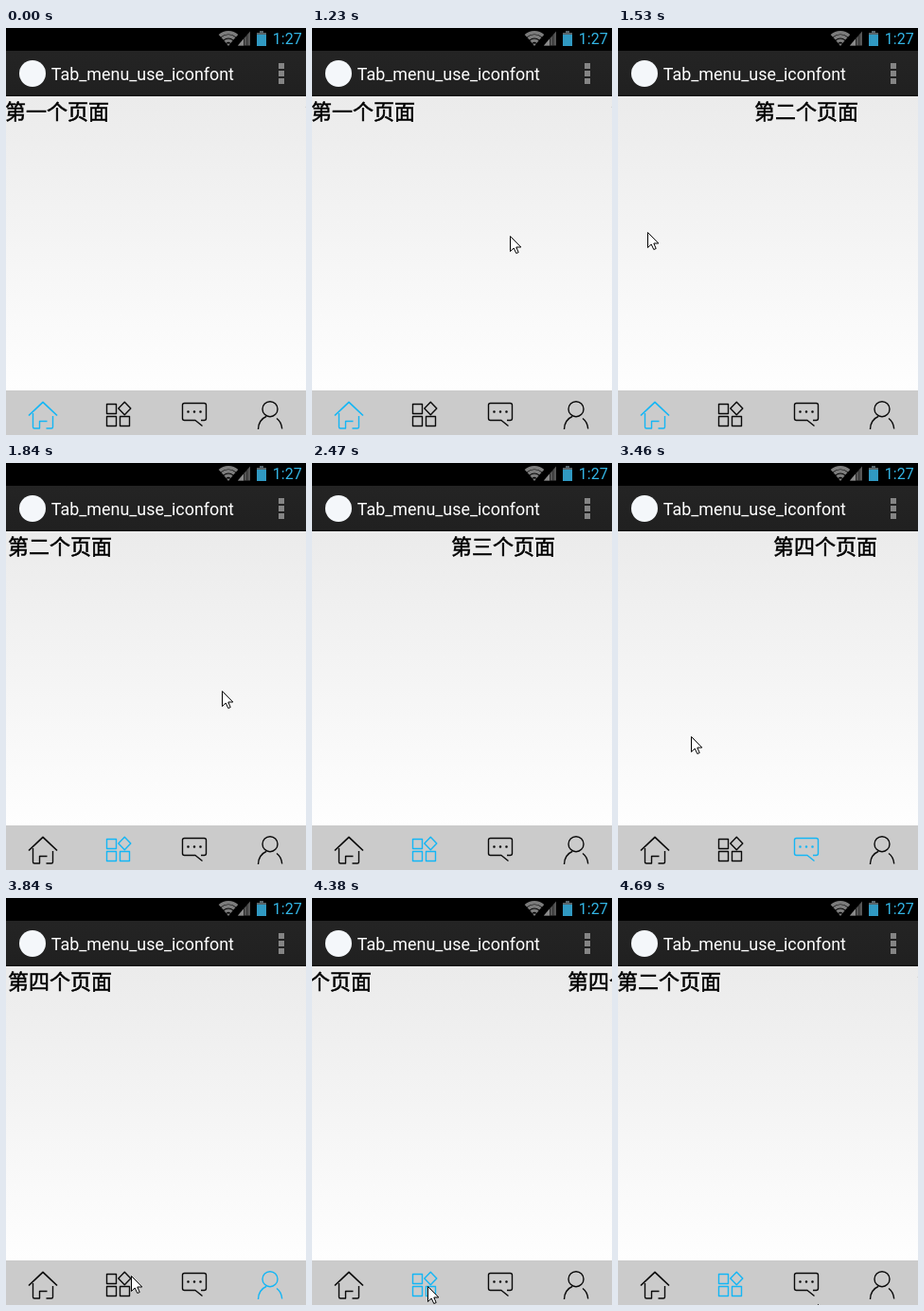
Recreate the animation shown at these times as an HTML page. Size 317x429 px, loop 5310 ms.

```html
<!DOCTYPE html>
<html lang="zh">
<head>
<meta charset="utf-8">
<title>Tab menu</title>
<style>
  html, body { margin: 0; width: 100%; height: 100%; overflow: hidden; background: #000; }
  svg { display: block; width: 100%; height: 100%; }
  .ui { font-family: Roboto, sans-serif; }
  .page { font: 500 22px "Noto Sans CJK SC", "Noto Sans CJK", sans-serif; stroke: #000; stroke-width: .5; }
  .tab { fill: none; stroke: #0a0a0a; stroke-width: 1.4; stroke-linejoin: round; }
  .tab.on { stroke: #14b6f5; }
  .dots { stroke-width: 2.6; stroke-linecap: round; }
</style>
</head>
<body>
<svg viewBox="0 0 317 429">
  <defs>
    <linearGradient id="paper" x2="0" y2="1">
      <stop stop-color="#ebebeb"/><stop offset="1" stop-color="#fefefe"/>
    </linearGradient>
    <linearGradient id="bar" x2="0" y2="1">
      <stop stop-color="#242424"/><stop offset="1" stop-color="#202020"/>
    </linearGradient>
  </defs>

  <rect y="72" width="317" height="310" fill="url(#paper)"/>
  <g id="pages" class="page"></g>

  <rect width="317" height="24" fill="#000"/>
  <g fill="none" stroke="#7c7c7c" stroke-width="3.5">
    <path d="M225.8 8.2A14 14 0 0 1 244.2 8.2M228.6 11.3A9.6 9.6 0 0 1 241.4 11.3M231.5 14.6A5.2 5.2 0 0 1 238.5 14.6"/>
    <path d="M233 16.6H237L235 19Z" fill="#7c7c7c" stroke="none"/>
  </g>
  <path d="M245 18.5L258 3.5V18.5Z" fill="#555"/>
  <path d="M245 18.5L251 11.6V18.5Z" fill="#8a8a8a"/>
  <path d="M251.5 10V19M254.8 7V19" stroke="#222" stroke-width=".8"/>
  <path d="M265 5H268V3H272V5H275V19H265Z" fill="#57646a"/>
  <path d="M265 7H275V19H265Z" fill="#3099c2"/>
  <text class="ui" x="281.8" y="17" font-size="16" fill="#33b5e5">1:27</text>

  <rect y="24" width="317" height="48" fill="url(#bar)"/>
  <rect y="70.5" width="317" height="1.5" fill="#121212"/>
  <circle cx="28" cy="48" r="14" fill="#f4f7fa"/>
  <text class="ui" x="47.8" y="55" font-size="17.9" fill="#fff">Tab_menu_use_iconfont</text>
  <path d="M288 37h6v6h-6zM288 45h6v6h-6zM288 53h6v6h-6z" fill="#858585"/>

  <rect y="382" width="317" height="47" fill="#cbcbcb"/>
  <g class="tab">
    <path d="M24 408.5L39 394.3L54 408.5" stroke-width="1.7"/>
    <path d="M28.5 406V420.5Q28.5 422 30 422H35.5V414.5H43.5M49.5 409V420.5Q49.5 422 48 422H42.5"/>
  </g>
  <g class="tab">
    <path d="M106.5 396.5h10v10h-10zM106.5 409.5h10v10h-10zM120.5 409.5h10v10h-10z"/>
    <path d="M125.3 394.3l6.5 6.7l-6.5 6.7l-6.5 -6.7z"/>
  </g>
  <g class="tab">
    <path d="M206 413.5H209.5Q211.5 413.5 211.5 411.5V397.5Q211.5 395.5 209.5 395.5H188.5Q186.5 395.5 186.5 397.5V411.5Q186.5 413.5 188.5 413.5H200L207.5 419.5"/>
    <path class="dots" d="M192.5 404.5h.01M199 404.5h.01M205.5 404.5h.01"/>
  </g>
  <g class="tab">
    <circle cx="279" cy="401.7" r="8"/>
    <path d="M266.5 423Q266.8 413 275 409.5M286 411.5Q291 415 291.7 422.5"/>
  </g>

  <path id="cursor" d="M.5 .5V16.5L4.2 13L6.8 18.5L9.2 17.5L6.8 12H11.8Z" fill="#fff" stroke="#000"/>
</svg>

<script>
const LOOP = 5310, WIDTH = 317;
const FIRST_STEP = 300, FPS = 13;      // the screen refreshes in steps
const DRAG = 370, SETTLE = 450, REACH = .56;
const SWIPES = [1223, 2165, 3223];     // start of each swipe to the next page
const TAP = 4340, TAP_DELAY = 30, JUMP = 350;

// Pointer legs: leave, arrive, x, y
const HOME = [38, 410];
const LEGS = [
  [300, 770, 225, 219],
  [1208, 1580, 28, 215], [1580, 2000, 263, 244],
  [2140, 2530, -40, 255], [2640, 3150, 305, 270],
  [3190, 3570, 54, 290], [3570, 3835, 132, 398],
  [3840, 4150, 118, 408],
  [4370, 4690, 211, 428]
];

const pages = document.getElementById("pages");
const cursor = document.getElementById("cursor");
const tabs = [...document.querySelectorAll(".tab")];

[..."一二三四"].forEach((n, i) => {
  const text = document.createElementNS(pages.namespaceURI, "text");
  text.setAttribute("x", i * WIDTH - 1);
  text.setAttribute("y", 95.6);
  text.textContent = `第${n}个页面`;
  pages.append(text);
});

const progress = (t, from, length) => Math.min(1, Math.max(0, (t - from) / length));
const easeOut = (u, power) => 1 - (1 - u) ** power;

// The finger drags a page partway, then the rest settles.
const swipe = (t, start) =>
  REACH * easeOut(progress(t, start, DRAG), 2) +
  (1 - REACH) * easeOut(progress(t, start + DRAG, SETTLE), 5);

function scrollAt(t) {
  const swiped = SWIPES.reduce((sum, start) => sum + swipe(t, start), 0);
  return swiped - 2 * easeOut(progress(t, TAP, JUMP), 5);
}

const tabAt = t =>
  t >= TAP + TAP_DELAY ? 1 : SWIPES.filter(start => t >= start + DRAG).length;

function pointerAt(t) {
  if (t < FIRST_STEP) return [-40, 0];
  let [x, y] = HOME;
  for (const [leave, arrive, toX, toY] of LEGS) {
    const u = easeOut(progress(t, leave, arrive - leave), 2);
    x += (toX - x) * u;
    y += (toY - y) * u;
  }
  return [Math.round(x), Math.round(y)];
}

function draw(time) {
  const step = Math.floor((time % LOOP - FIRST_STEP) * FPS / 1000);
  const t = FIRST_STEP + step * 1000 / FPS;
  pages.setAttribute("transform", `translate(${Math.round(-scrollAt(t) * WIDTH)} 0)`);
  cursor.setAttribute("transform", `translate(${pointerAt(t)})`);
  tabs.forEach((tab, i) => tab.classList.toggle("on", i === tabAt(t)));
}

const start = performance.now();
function tick() {
  draw(performance.now() - start);
  requestAnimationFrame(tick);
}
tick();
</script>
</body>
</html>
```
